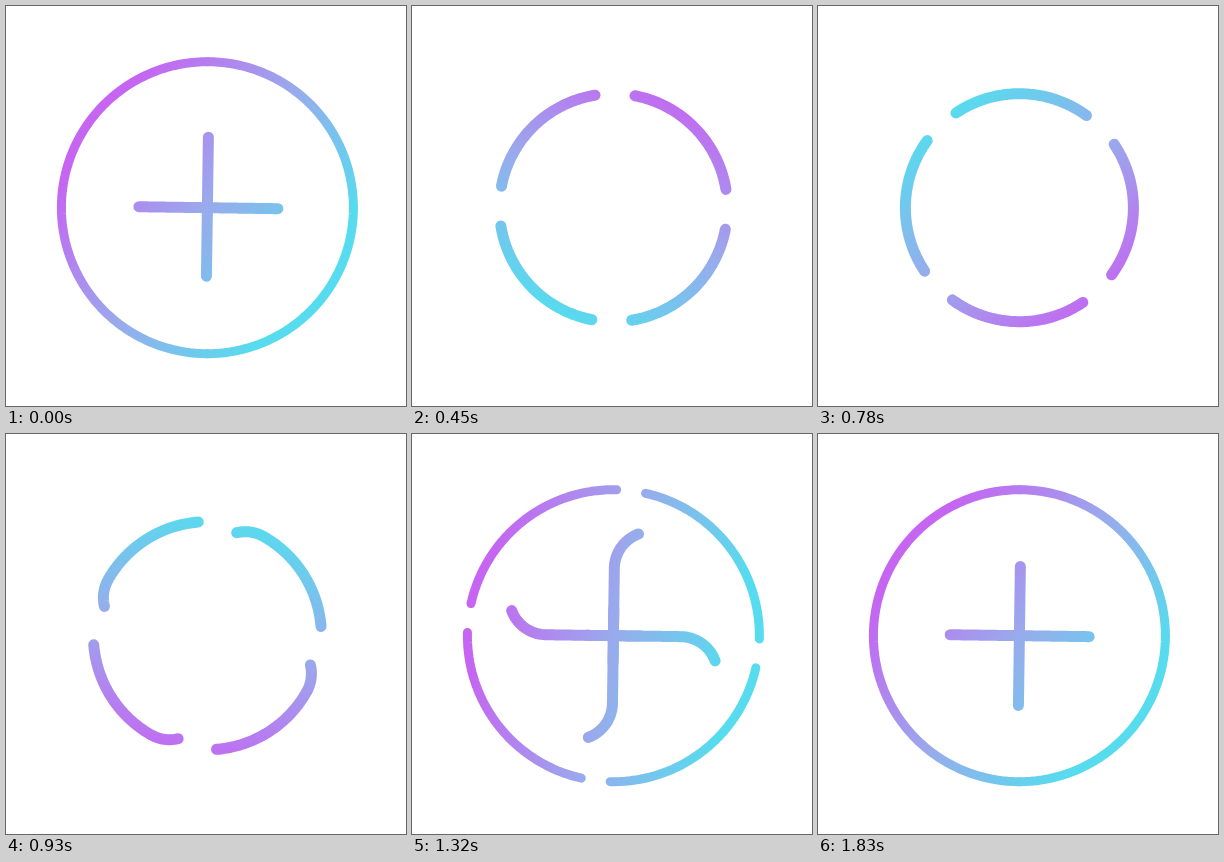
Animation of 400x400 px, one loop 3860 ms. Source, as an HTML page:

```html
<!DOCTYPE html>
<html lang="en">
<head>
<meta charset="utf-8">
<title>Plus loop</title>
<style>
  html, body { margin: 0; width: 100%; height: 100%; overflow: hidden; background: #fff; }
  svg { display: block; width: 100%; height: 100%; }
  path { fill: none; stroke: url(#tint); stroke-linecap: round; stroke-linejoin: round; }
  .ring { stroke-width: 9; }
  .arm { stroke-width: 11; }
</style>
</head>
<body>
<svg viewBox="0 0 400 400">
  <defs>
    <linearGradient id="tint" gradientUnits="userSpaceOnUse" x1="146" y1="0" x2="-146" y2="0">
      <stop offset="0.04" stop-color="#c565f1"/>
      <stop offset="0.5" stop-color="#98abec"/>
      <stop offset="0.92" stop-color="#56dcee"/>
    </linearGradient>
  </defs>
  <g id="stage" transform="translate(201.4 201.7)"></g>
</svg>
<script>
const LOOP = 3860, END = 1830, STEP = 30;
const RING = 146, ORBIT = 114, REACH = 69.5, LENGTH = 139;
const TILT = 0.8 * Math.PI / 180, HALF = Math.PI / 2;

// [time, value, slope]
const TRAVEL = [
  [0, 1, 0.06], [240, 125, 1.1], [630, 525, 0.75], [930, 707, 0.48],
  [1140, 791, 0.37], [1560, 889.8, 0.03], [1830, 892.6, 0]
];
const TURN = [
  [0, -143, 0], [240, -122, 0.2], [630, 0, 0.34], [930, 102, 0.3],
  [1140, 155, 0.22], [1560, 216, 0.01], [1830, 217, 0]
];

const stage = document.getElementById('stage');
const tint = document.getElementById('tint');
const makePaths = name => [0, 1, 2, 3].map(() => {
  const p = document.createElementNS('http://www.w3.org/2000/svg', 'path');
  p.setAttribute('class', name);
  return stage.appendChild(p);
});
const rings = makePaths('ring');
const arms = makePaths('arm');

const clamp = x => Math.min(1, Math.max(0, x));
const polar = (r, a) => [r * Math.cos(a), r * Math.sin(a)];

// Smooth curve through keys with given slopes
function curve(keys, t) {
  let i = 0;
  while (i < keys.length - 2 && t > keys[i + 1][0]) i++;
  const [t0, a, m] = keys[i], [t1, b, n] = keys[i + 1];
  const d = t1 - t0, x = clamp((t - t0) / d), y = 1 - x;
  return a * y * y * (1 + 2 * x) + b * x * x * (3 - 2 * x) + d * x * y * (m * y - n * x);
}

// Bend that joins an axis to the orbit circle
function bend(r) {
  const phi = Math.asin(r / (ORBIT - r));
  return { r, phi, h: (ORBIT - r) * Math.cos(phi), len: r * (HALF + phi) };
}
const out = bend(35), back = bend(37);
const orbitLen = ORBIT * (2 * Math.PI - out.phi - back.phi);

// Track: up from the centre, left onto the orbit, once round, back down
function track(s) {
  let u = s + REACH;
  if (u < out.h) return [0, -u];
  u -= out.h;
  if (u < out.len) {
    const [x, y] = polar(out.r, -u / out.r);
    return [x - out.r, y - out.h];
  }
  u -= out.len;
  if (u < orbitLen) return polar(ORBIT, -HALF - out.phi - u / ORBIT);
  u -= orbitLen;
  if (u < back.len) {
    const [x, y] = polar(back.r, -HALF + back.phi - u / back.r);
    return [x + back.r, y - back.h];
  }
  return [0, u - back.len - back.h];
}

function spin([x, y], a) {
  const c = Math.cos(a), s = Math.sin(a);
  return [x * c - y * s, x * s + y * c];
}

function line(at, turn, n) {
  let d = '';
  for (let i = 0; i <= n; i++) {
    const [x, y] = spin(at(i / n), turn);
    d += (i ? 'L' : 'M') + x.toFixed(2) + ' ' + y.toFixed(2);
  }
  return d;
}

// Head angle and span of one ring quarter, in degrees
function quarter(t) {
  if (t < 600) {
    return { head: -90 - 3.3 * (t / 240) ** 2, span: 90 * (1 - clamp(t / 315) ** 1.5) };
  }
  const rest = (1 - clamp((t - 995) / 505)) ** 2;
  const span = 90 * (1 - rest);
  return { head: 10 * rest - span, span };
}

function draw(t) {
  const head = curve(TRAVEL, t);
  const { head: start, span } = quarter(t);
  const rad = Math.PI / 180;
  tint.setAttribute('gradientTransform', `rotate(${curve(TURN, t).toFixed(2)})`);

  for (let i = 0; i < 4; i++) {
    const turn = i * HALF;
    rings[i].setAttribute('d', span > 0.1
      ? line(k => polar(RING, (start + span * k) * rad), turn, 40) : '');
    // At rest one stroke per axis is enough
    const hidden = t < 30 ? i > 1 : t >= 1530 && i % 3 === 0;
    arms[i].setAttribute('d', hidden
      ? '' : line(k => track(head - LENGTH * k), turn + TILT, 70));
  }
}

const origin = performance.now();
function tick() {
  const t = (performance.now() - origin) % LOOP;
  draw(Math.min(END, Math.floor(t / STEP) * STEP));
  requestAnimationFrame(tick);
}
tick();
</script>
</body>
</html>
```
